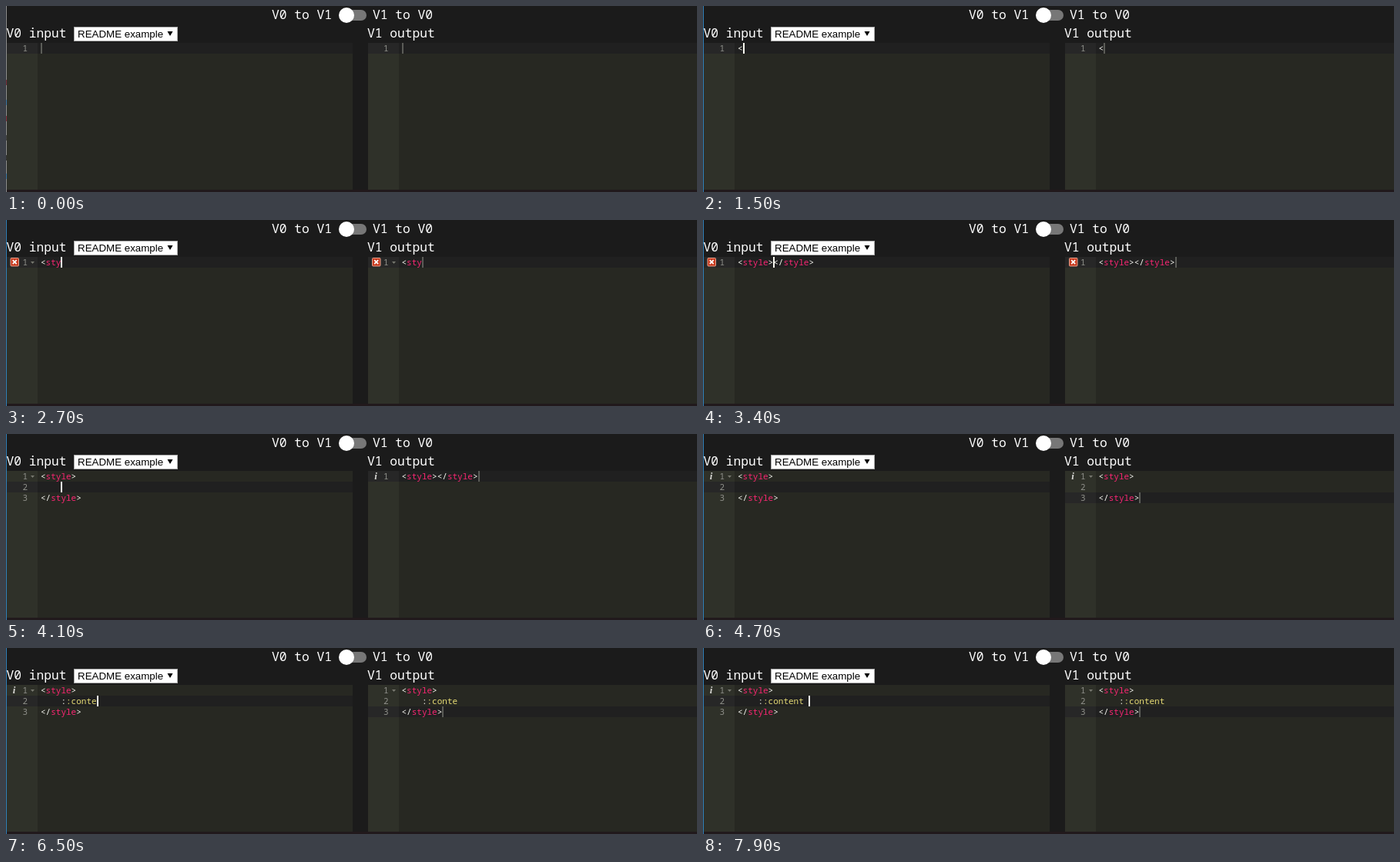
Recreate the animation shown at these times as an HTML page. Size 897 by 242 pixels, loop 8 s.

```html
<!DOCTYPE html>
<html lang="en">
<head>
<meta charset="utf-8">
<title>V0 to V1 editor</title>
<style>
  html, body { margin: 0; width: 100%; height: 100%; overflow: hidden; background: #1b1b1b; }
  svg { display: block; }
  text { white-space: pre; }
  .head { font: 16.28px "Noto Sans Mono", monospace; fill: #fff; }
  .code { font: 11px "Noto Sans Mono", monospace; fill: #f8f8f2; }
  .num { font: 11px "Noto Sans Mono", monospace; fill: #8f908a; text-anchor: end; }
  .tag { fill: #f92672; }
  .str { fill: #e6db74; }
  .info { font: italic bold 13px "Liberation Serif", serif; fill: #d8d8d4; }
  .pick { font: 13.333px "Liberation Sans", sans-serif; fill: #000; }
</style>
</head>
<body>
<svg width="897" height="242" viewBox="0 0 897 242">
  <rect width="897" height="242" fill="#1b1b1b"/>
  <g class="head">
    <text x="345" y="17">V0 to V1</text>
    <text x="476" y="17">V1 to V0</text>
    <text x="0.5" y="41">V0 input</text>
    <text x="469" y="41">V1 output</text>
  </g>
  <rect x="435" y="5" width="33" height="14" rx="7" fill="#777"/>
  <circle cx="442" cy="12" r="10" fill="#fff"/>
  <rect x="88.5" y="27.5" width="134" height="18" fill="#fff" stroke="#a9a9a9"/>
  <text class="pick" x="93" y="41">README example</text>
  <path d="M209.5 33h7l-3.5 6z" fill="#000"/>
  <g id="left"></g>
  <g id="right"></g>
  <rect y="239" width="897" height="3" fill="#21191c"/>
  <g id="edge"></g>
</svg>
<script>
const LOOP = 8000, CHAR = 6.6, LINE = 14, TOP = 48;
const FOCUS = 600;
const $ = id => document.getElementById(id);

// Text edits: [time, text before the caret, text after it]
const edits = [[0, '', ''], [1500, '<', '']];
[2400, 2500, 2700, 3000, 3100].forEach((t, i) => edits.push([t, '<style'.slice(0, i + 2), '']));
edits.push([3400, '<style>', '</style>']);
const typeRule = (t, s) => edits.push([t, '<style>\n    ' + s, '\n</style>']);
[4100, 4200, 5300, 5400, 5900, 6000, 6100, 6300, 6500, 6800, 7100, 7900]
  .forEach((t, i) => typeRule(t, '::content '.slice(0, Math.max(0, i - 1))));

const leftMarks = [[0, ''], [1800, 'error'], [3700, 'info'], [4100, ''], [4500, 'info']];
const rightMarks = [[0, ''], [1900, 'error'], [3700, 'info']];
[4200, 4500, 5300, 5600, 5900, 6200, 6300, 6700, 6800, 7200, 7900]
  .forEach((t, i) => rightMarks.push([t, i % 2 ? 'info' : '']));

const at = (list, t) => list.filter(e => e[0] <= t).pop();
const rect = (x, y, w, h, fill) =>
  `<rect x="${x}" y="${y}" width="${w}" height="${h}" fill="${fill}"/>`;
const esc = s => s.replace(/</g, '&lt;').replace(/>/g, '&gt;');
const span = (cls, s) => `<tspan class="${cls}">${esc(s)}</tspan>`;

function colour(s) {
  return s.replace(/[a-z]+|:[a-z]+|[<>\/:]+?(?=:[a-z])|[<>\/:]/g, m =>
    /^:[a-z]/.test(m) ? span('str', m) : /^[a-z]/.test(m) ? span('tag', m) : esc(m));
}

function mark(kind, x) {
  if (kind === 'info') return `<text class="info" x="${x + 8.7}" y="59">i</text>`;
  if (kind !== 'error') return '';
  return `<rect x="${x + 6}" y="49.5" width="10.5" height="10.5" rx="1" fill="#c93a1e" stroke="#e3a08c"/>` +
    `<path d="M${x + 8.7} 52.2l5 5m0-5l-5 5" stroke="#fff" stroke-width="1.8"/>`;
}

function pane(p, text, row, col, kind, caret) {
  const lines = text.split('\n');
  const activeY = TOP + row * LINE;
  let out = rect(p.x, TOP, p.w, 191, '#272822') + rect(p.x, TOP, 40, 191, '#2f3129') +
    rect(p.x, activeY, p.w, LINE, '#202020') + rect(p.x, activeY, 40, LINE, '#272727');
  lines.forEach((line, i) => {
    const y = TOP + 11 + i * LINE;
    const body = line.trimStart();
    const x = p.text + (line.length - body.length) * CHAR;
    out += `<text class="num" x="${p.text - 17}" y="${y}">${i + 1}</text>`;
    out += `<text class="code" x="${x}" y="${y}">${colour(body)}</text>`;
  });
  if (lines.length > 1 || /^<[a-z]+$/.test(text)) {
    const x = Math.round(p.text - 13);
    out += `<path d="M${x} 54h5l-2.5 3z" fill="#77786f"/>`;
  }
  out += mark(kind, p.icon);
  if (caret) out += rect(Math.round(p.text + col * CHAR), activeY, 2, LINE, caret);
  return out;
}

function edge(focused) {
  if (focused) return rect(0, 0, 1, 242, '#2f7fb8');
  const bits = [[96, '#7a2f3c'], [122, '#3a78a8'], [143, '#8a3040'], [168, '#444'], [194, '#333'], [218, '#3a78a8']];
  return rect(0, 0, 1, 242, '#8c8c8c') + bits.map(([y, c]) => rect(0, y, 1, 7, c)).join('');
}

const shown = {};
function put(id, html) {
  if (shown[id] !== html) $(id).innerHTML = shown[id] = html;
}

const leftPane = { x: 1, w: 449, text: 45, icon: 0 };
const rightPane = { x: 470, w: 427, text: 513.5, icon: 469.5 };
const DIM = '#5b5c57';

function draw(t) {
  const [typed, before, after] = at(edits, t);
  const head = before.split('\n');
  const blink = (t - Math.max(typed, FOCUS)) % 900 < 500;
  const caret = t < FOCUS ? DIM : blink ? '#f8f8f0' : '';
  put('left', pane(leftPane, before + after, head.length - 1, head.at(-1).length, at(leftMarks, t)[1], caret));

  // The output pane takes the line break one tick late.
  const [, b, a] = at(edits, t >= 4100 && t < 4200 ? 4000 : t);
  const rows = (b + a).split('\n');
  put('right', pane(rightPane, b + a, rows.length - 1, rows.at(-1).length, at(rightMarks, t)[1], DIM));
  put('edge', edge(t >= FOCUS));
}

const start = performance.now();
function tick() {
  draw((performance.now() - start) % LOOP);
  requestAnimationFrame(tick);
}
tick();
</script>
</body>
</html>
```
